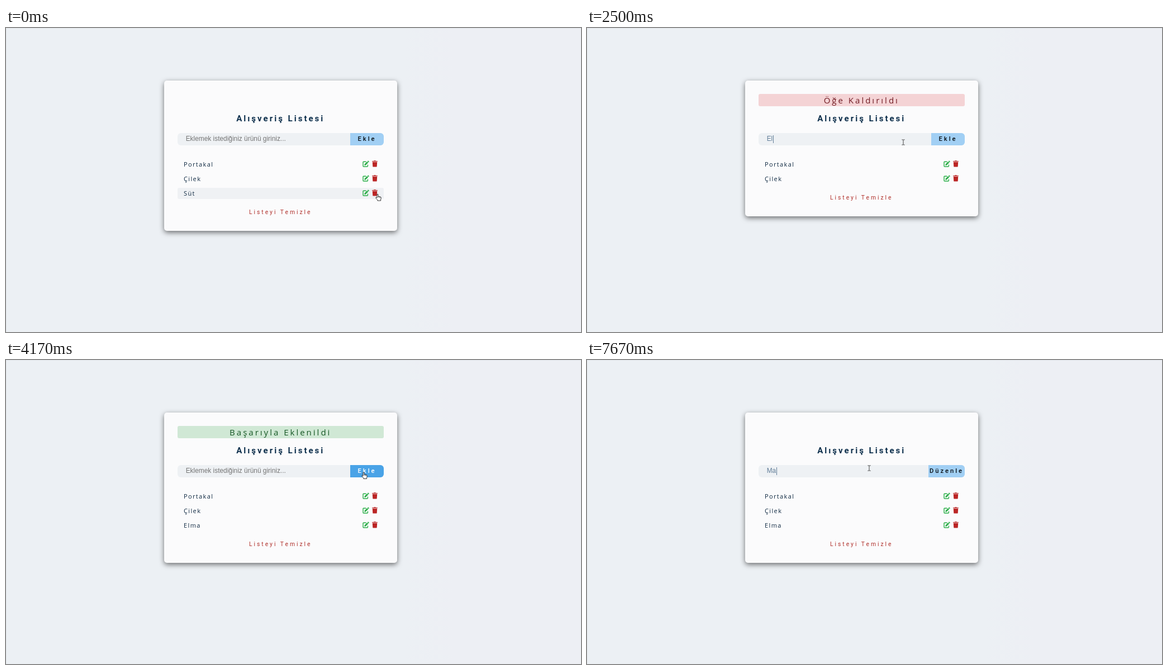
Write an HTML page that moves like this. It is 1029x544 px and loops after 8000 ms.

```html
<!DOCTYPE html>
<html lang="tr">
<head>
<meta charset="utf-8">
<title>Alışveriş Listesi</title>
<style>
  html, body { margin: 0; width: 100%; height: 100%; overflow: hidden; }
  body {
    position: relative;
    background: linear-gradient(90deg, #ecf0f4 69%, #edeff4 78%);
    box-shadow: inset 1px 1px #e2e6eb;
    font-family: "Open Sans", sans-serif;
  }
  body *, .row::before { position: absolute; box-sizing: border-box; white-space: pre; }
  .card {
    left: 282.5px; top: 94px; width: 417.5px;
    border-radius: 5px;
    background: #fbfbfc;
    box-shadow: 0 3px 10px rgba(0, 0, 0, .55);
  }
  .center { left: 24px; width: 369.5px; text-align: center; letter-spacing: 3px; }
  .alert { top: 23.5px; height: 22.5px; border-radius: 3px; font-size: 15px; line-height: 23px; }
  .alert.removed { background: #f4d3d5; color: #721c24; }
  .alert.added { background: #d0e8d5; color: #155724; }
  .title { top: 58px; font: bold 15px/21px Roboto, sans-serif; color: #0c2e4b; }
  .clear { font: 10.3px/16px Roboto, sans-serif; color: #b0302b; }
  .form {
    left: 24px; top: 94px; width: 369.5px; height: 22px;
    border-radius: 6px; overflow: hidden; background: #eef1f4;
  }
  .field { left: 15.2px; top: 0; font: 11.9px/21.5px "Liberation Sans", Arial, sans-serif; color: #617d98; }
  .field.empty { color: #757575; }
  .caret { top: 4px; width: 1px; height: 14px; background: #617d98; }
  .button {
    right: 0; top: 0; height: 100%;
    background: #a1cff4; color: #0a1016;
    font: 500 11.2px/21px Roboto, sans-serif; letter-spacing: 3px; text-align: center;
  }
  .button.hover { background: #49a3e7; color: #fff; }
  .row { left: 24px; width: 369.5px; height: 20px; }
  .row::before {
    content: ""; inset: 0; border-radius: 3px;
    background: #eff1f4; opacity: var(--glow, 0);
  }
  .row span { left: 11.5px; font-size: 11px; line-height: 20px; letter-spacing: 1.37px; color: #102a42; }
  .row svg { top: 3px; width: 12px; height: 12px; }
  .edit { left: 331.5px; }
  .trash { left: 347.5px; }
  .cursor { left: 0; top: 0; width: 1px; height: 1px; overflow: visible; }
</style>
</head>
<body>
<svg width="0" height="0">
  <symbol id="edit" viewBox="0 0 12 12">
    <path d="M6.5 2.2H2Q1 2.2 1 3.2V10Q1 11 2 11H8.4Q9.4 11 9.4 10V7.4" fill="none" stroke="#2bae48" stroke-width="1.4"/>
    <path d="M3.7 6.6 8.2 2.1 10.2 4.1 5.7 8.6 3.3 9ZM8.8 1.5 9.6.7Q10.1.3 10.6.7L11.6 1.7Q12 2.2 11.6 2.7L10.8 3.5Z" fill="#2bae48"/>
  </symbol>
  <symbol id="trash" viewBox="0 0 12 12">
    <path d="M1.2 1H4L4.5.2H7.5L8 1H10.8V2.3H1.2ZM1.8 3H10.2L9.7 10.7Q9.6 11.6 8.7 11.6H3.3Q2.4 11.6 2.3 10.7Z" fill="#bb2525"/>
  </symbol>
</svg>
<div class="card">
  <div class="center alert"></div>
  <div class="center title">Alışveriş Listesi</div>
  <div class="form">
    <span class="field"></span>
    <i class="caret"></i>
    <div class="button"></div>
  </div>
  <div class="center clear">Listeyi Temizle</div>
</div>
<svg class="cursor">
  <g data-kind="hand">
    <path d="M-1 .8Q0-.6 1 .8V4.3L5.2 5.2Q6.4 5.6 6.3 7L5.6 10V12H-.2V10.7L-3.2 7.2Q-3.4 5.7-2.2 5.9L-1 7Z"
      fill="#fff" stroke="#222" stroke-width=".9" stroke-linejoin="round"/>
    <path d="M1 4.5V6.3M2.8 4.8V6.5M4.5 5.2V6.8" stroke="#222" stroke-width=".7"/>
  </g>
  <path data-kind="arrow" d="M.5.5V10.2L2.7 8.2 4.2 11.7 5.8 11 4.4 7.7H7.2Z" fill="#fff" stroke="#333" stroke-width=".9"/>
  <path data-kind="beam" d="M-2.6-4.6H-.8L0-4 .8-4.6H2.6M0-4V4M-2.6 4.6H-.8L0 4 .8 4.6H2.6" fill="none" stroke="#444" stroke-width="1"/>
</svg>
<script>
const LOOP = 8000, STEP = 500 / 3;
const REMOVE = 3, ADD = 23, EDIT = 34, ALERT_STEPS = 13;
const PLACEHOLDER = "Eklemek istediğiniz ürünü giriniz...";

// [step, x, y] of the pointer's hot spot
const route = [
  [0, 665, 297], [2, 663, 296.5], [6, 663, 296.5], [11, 566, 204.5], [18, 566, 204.5],
  [19, 567, 204.5], [20, 567, 204.5], [21, 588, 204], [22, 622, 202], [23, 640, 200.5],
  [27, 640, 200.5], [32, 644, 297], [34, 644, 297], [35, 628, 292], [36, 575, 246],
  [37, 547, 232.5], [38, 527, 212], [39, 511, 198], [40, 505, 193.5]
];
// [step, text in the field]
const typing = [
  [0, ""], [14, "E"], [15, "El"], [17, "Elm"], [18, "Elma"], [ADD, ""], [EDIT, "Elma"],
  [41, "Elm"], [42, "El"], [43, "E"], [44, ""], [45, "M"], [46, "Ma"]
];

const $ = selector => document.querySelector(selector);
const card = $(".card"), alertBar = $(".alert"), field = $(".field"), caret = $(".caret");
const button = $(".button"), clear = $(".clear"), cursor = $(".cursor");
const show = (el, on) => { el.style.display = on ? "" : "none"; };
const within = (step, from, to) => step >= from && step < to;

const rows = [0, 1, 2].map(i => {
  const row = document.createElement("div");
  row.className = "row";
  row.style.top = 140 + 26.2 * i + "px";
  row.innerHTML = '<span></span><svg class="edit"><use href="#edit"/></svg><svg class="trash"><use href="#trash"/></svg>';
  card.append(row);
  return row;
});

function itemsAt(step) {
  const last = step < REMOVE ? ["Süt"] : step >= ADD ? ["Elma"] : [];
  return ["Portakal", "Çilek", ...last];
}

function pointerAt(step) {
  const next = route.findIndex(p => p[0] > step);
  if (next < 0) return route.at(-1).slice(1);
  const [s0, x0, y0] = route[next - 1], [s1, x1, y1] = route[next];
  const k = (step - s0) / (s1 - s0);
  return [x0 + (x1 - x0) * k, y0 + (y1 - y0) * k];
}

function hoverAt(step) {
  const [x, y] = pointerAt(step);
  const inForm = y > 188 && y < 210 && x > 306 && x < 676;
  const overButton = inForm && x > (step >= EDIT ? 611 : 616);
  const row = itemsAt(step).findIndex((_, i) => Math.abs(y - 244 - 26.2 * i) < 10);
  const overIcon = row >= 0 && x > 637 && x < 667;
  const kind = overButton || overIcon ? "hand" : inForm ? "beam" : "arrow";
  return { x, y, row, overButton, kind };
}

function draw(step) {
  const items = itemsAt(step), hover = hoverAt(step);
  const recent = [1, 2].map(n => hoverAt(Math.max(0, step - n)).row);

  rows.forEach((row, i) => {
    show(row, i < items.length);
    row.firstChild.textContent = items[i] || "";
    row.style.setProperty("--glow", hover.row === i ? 1 : recent.includes(i) ? .3 : 0);
  });
  card.style.height = 190.6 + 26.2 * items.length + "px";
  clear.style.top = 149.4 + 26.2 * items.length + "px";

  const removed = within(step, REMOVE, REMOVE + ALERT_STEPS);
  const added = within(step, ADD, ADD + ALERT_STEPS);
  show(alertBar, removed || added);
  alertBar.className = "center alert " + (removed ? "removed" : "added");
  alertBar.textContent = removed ? "Öğe Kaldırıldı" : "Başarıyla Eklenildi";

  const text = typing.findLast(entry => entry[0] <= step)[1];
  field.textContent = text || PLACEHOLDER;
  field.classList.toggle("empty", !text);
  show(caret, within(step, 12, ADD) || step >= 40);
  caret.style.left = 15.2 + (text ? field.offsetWidth : 0) + "px";

  button.textContent = step >= EDIT ? "Düzenle" : "Ekle";
  button.style.width = step >= EDIT ? "65px" : "60px";
  button.classList.toggle("hover", hover.overButton);

  for (const shape of cursor.children) show(shape, shape.dataset.kind === hover.kind);
  cursor.style.transform = `translate(${hover.x}px, ${hover.y}px)`;
}

let shown = -1;
function tick(now) {
  const step = Math.floor((now % LOOP) / STEP + .03) % 48;
  if (step !== shown) draw(shown = step);
  requestAnimationFrame(tick);
}
tick(0);
</script>
</body>
</html>
```
